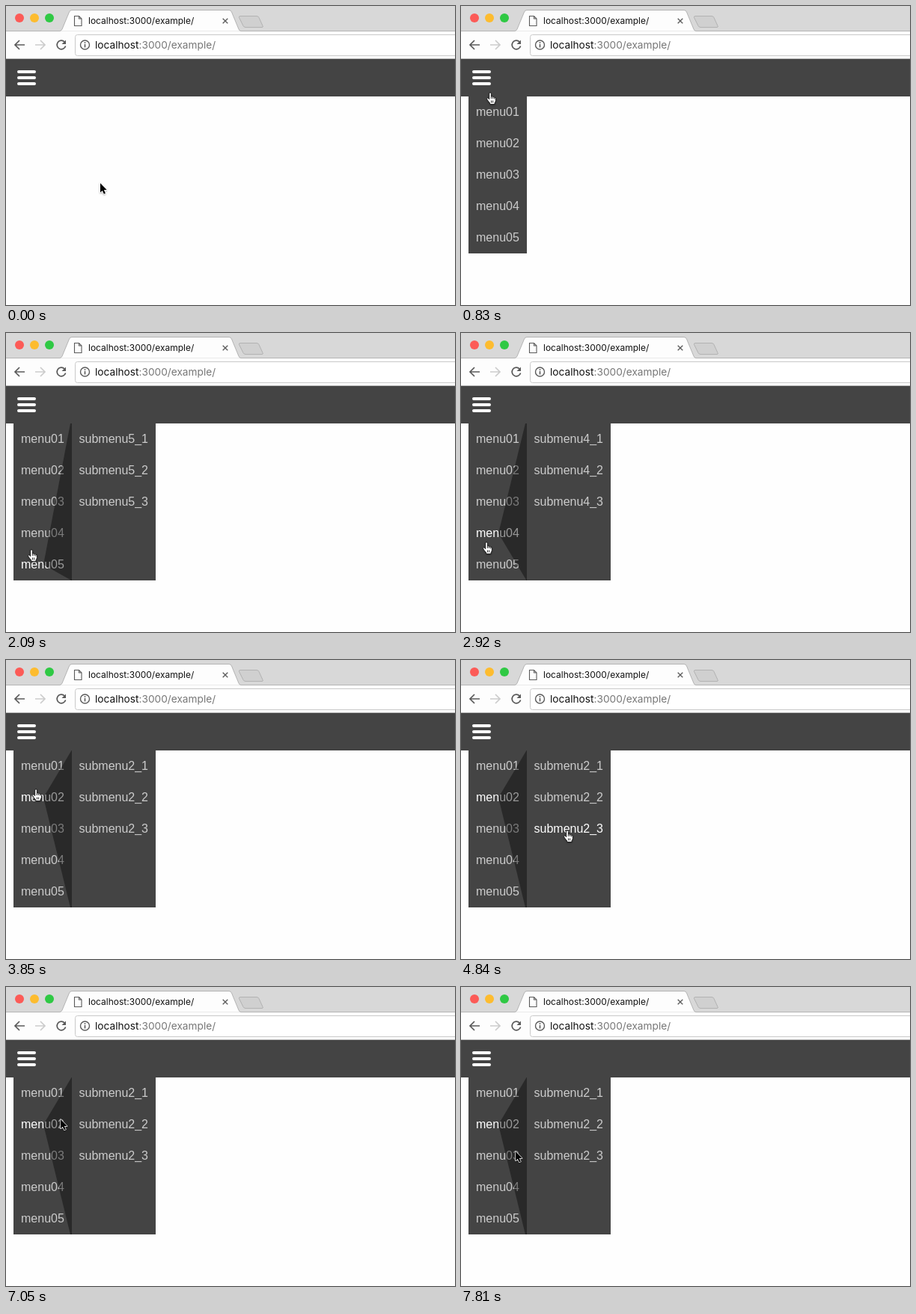
These frames come from a looping animation (600x400 px, 8 s). An HTML page:

```html
<!DOCTYPE html>
<html lang="en">
<head>
<meta charset="utf-8">
<title>Menu aim</title>
<style>
  html, body { margin: 0; width: 100%; height: 100%; overflow: hidden; background: #fefefe; }
  svg { display: block; width: 600px; height: 400px; }
  .ui { font-family: Inter, Roboto, sans-serif; }
  .menu { font: 16px "Liberation Sans", Arial, sans-serif; fill: #ccc; }
  .menu .on { fill: #fff; }
  .icon { fill: none; stroke: #5a5a5a; stroke-width: 1.7; }
</style>
</head>
<body>
<svg viewBox="0 0 600 400">
  <defs>
    <filter id="shade" x="-50%" y="-50%" width="200%" height="200%">
      <feDropShadow dx="0" dy="1" stdDeviation=".8" flood-opacity=".35"/>
    </filter>
  </defs>

  <!-- browser window -->
  <rect width="600" height="34" fill="#d8d8d8"/>
  <circle cx="18" cy="16" r="6" fill="#fc5b57"/>
  <circle cx="38" cy="16" r="6" fill="#fdbc2f"/>
  <circle cx="58" cy="16" r="6" fill="#2fc944"/>
  <rect y="34" width="600" height="37" fill="#fdfdfd"/>
  <path d="M0 33.5H72Q74 33 75 31L84.500 8Q85.500 5.500 88 5.500H298Q300.500 5.500 301.500 8L311 31Q312 33.500 314 33.500H600" fill="#fdfdfd" stroke="#b4b4b4"/>
  <path d="M73 34H313V36H73Z" fill="#fdfdfd"/>
  <path d="M313 13.500H335Q337 13.500 338 15.500L343 26.500Q344 28.500 342 28.500H320Q318 28.500 317 26.500L311.500 15.500Q311 13.500 313 13.500Z" fill="#d0d0d0" stroke="#b2b2b2"/>
  <path d="M91.500 13.500H97.500L101 17V26.500H91.500ZM97.500 13.500V17H101" class="icon" style="stroke-width:1.100"/>
  <path d="M289.700 16.700L296.300 23.300M296.300 16.700L289.700 23.300" class="icon" style="stroke-width:1.300"/>
  <text class="ui" x="110" y="24.300" font-size="12" fill="#111">localhost:3000/example/</text>
  <path d="M25 52H12M18 46L12 52L18 58" class="icon"/>
  <path d="M39 52H52M46 46L52 52L46 58" class="icon" style="stroke:#ccc"/>
  <path d="M78.200 48A5.800 5.800 0 1 0 79.600 53.500" class="icon"/>
  <path d="M80 45.500V51H74.500Z" fill="#5a5a5a"/>
  <rect x="92.500" y="38.500" width="520" height="28" rx="3" fill="#fff" stroke="#c9c9c9"/>
  <circle cx="105.500" cy="52" r="6" class="icon" style="stroke-width:1.400"/>
  <path d="M105.500 51V55.500M105.500 48.300V50" class="icon" style="stroke-width:1.600"/>
  <text class="ui" x="119" y="57" font-size="13.700" fill="#111">localhost<tspan fill="#777">:3000/example/</tspan></text>

  <!-- page -->
  <path d="M0 70.500H600" stroke="#b8b8b8"/>
  <rect y="71" width="600" height="50" fill="#444"/>
  <path d="M17 88H38M17 96H38M17 104H38" stroke="#fff" stroke-width="4" stroke-linecap="round"/>
  <g id="menu" class="menu">
    <rect x="10" y="121" width="78" height="210" fill="#444"/>
    <g id="items"></g>
    <g id="submenu">
      <rect x="88" y="121" width="112" height="210" fill="#444"/>
      <g id="subitems"></g>
      <polygon id="wedge" fill="#000" fill-opacity=".4"/>
    </g>
  </g>

  <g id="cursor" filter="url(#shade)" stroke-linejoin="round">
    <path id="arrow" d="M0 0V12.400L2.800 9.900L4.900 14.400L6.900 13.500L4.900 9.100H8.700Z" fill="#000" stroke="#fff" stroke-width="1.300" paint-order="stroke"/>
    <path id="hand" d="M-1.300 8V1.200Q-1.200 -.3 0 -.3Q1.300 -.3 1.400 1.200V5.300Q2.700 4.500 3.600 5.700Q4.900 5.200 5.700 6.400Q7.300 6.200 7.400 7.800V10.500Q7.200 12.300 6 13.700V15.500H-.3V14Q-2 12.300 -4.200 8.900Q-4.900 7.500 -3.700 7.100Q-2.600 6.800 -1.300 8.800ZM1.400 5.300V8M3.600 5.900V8M5.700 6.600V8.500M1.500 10.500V13.500M3.600 10.500V13.500" fill="#fff" stroke="#111" stroke-width=".9"/>
  </g>
</svg>
<script>
const LOOP = 8000, TOP = 121, ROW = 42, MENU_RIGHT = 88, TIP_X = 50;
const $ = id => document.getElementById(id);

const ease = {
  linear: p => p,
  in: p => p * p,
  out: p => 1 - (1 - p) ** 2,
  both: p => p * p * (3 - 2 * p),
};

// Pointer moves: first step, last step (ms), step count, destination x, y, easing
const moves = [
  [480, 940, 9, 27, 99, 'both'],
  [1480, 1590, 3, 25, 141, 'linear'],
  [1646, 2210, 11, 35, 302, 'out'],
  [2330, 2330, 1, 34, 302, 'linear'],
  [2570, 2920, 6, 34, 280, 'in'],
  [2980, 3320, 7, 40, 191, 'linear'],
  [3380, 3490, 3, 39, 171, 'out'],
  [3670, 3850, 3, 39.5, 173, 'linear'],
  [4090, 4660, 11, 141, 231, 'both'],
  [4840, 4840, 1, 142, 228, 'linear'],
  [4900, 5550, 12, 143, 136, 'both'],
  [5720, 6130, 8, 144, 183, 'both'],
  [6250, 6470, 5, 140, 179, 'linear'],
  [6530, 6760, 5, 73, 176, 'both'],
  [7050, 7810, 14, 73, 220, 'both'],
];

const rowAt = y => Math.floor((y - TOP) / ROW) + 1;
const tipY = item => TOP + ROW * (item - 0.5);

function inWedge(x, y, item) {
  if (!item || x < TIP_X || x >= MENU_RIGHT) return false;
  const reach = (x - TIP_X) / (MENU_RIGHT - TIP_X), tip = tipY(item);
  return y > tip - (tip - TOP) * reach && y < tip + (TOP + 5 * ROW - tip) * reach;
}

// Each pose follows from the previous one and the new pointer position
function nextPose(prev, t, x, y) {
  const pose = { t, x, y, open: prev.open, item: prev.item, sub: 0, hand: false };
  if (y < TOP) {
    pose.open = pose.hand = true;
  } else if (pose.open && !inWedge(x, y, pose.item)) {
    const row = rowAt(y);
    if (x < MENU_RIGHT) {
      pose.item = row;
      pose.hand = true;
    } else if (pose.item && row <= 3) {
      pose.sub = row;
      pose.hand = true;
    }
  }
  return pose;
}

const poses = [{ t: 0, x: 126, y: 237, open: false, item: 0, sub: 0, hand: false }];
for (const [start, end, count, x, y, curve] of moves) {
  const from = poses[poses.length - 1];
  for (let k = 1; k <= count; k++) {
    const p = ease[curve](k / count);
    const t = count > 1 ? start + (end - start) * (k - 1) / (count - 1) : start;
    poses.push(nextPose(poses[poses.length - 1], t,
      from.x + (x - from.x) * p, from.y + (y - from.y) * p));
  }
}

function addRows(parent, x, count) {
  return Array.from({ length: count }, (_, i) => {
    const text = document.createElementNS('http://www.w3.org/2000/svg', 'text');
    text.setAttribute('x', x);
    text.setAttribute('y', TOP + ROW * i + 26);
    return parent.appendChild(text);
  });
}
const items = addRows($('items'), 20, 5);
const subitems = addRows($('subitems'), 97.5, 3);
items.forEach((text, i) => { text.textContent = `menu0${i + 1}`; });

const show = (el, on) => { el.style.display = on ? '' : 'none'; };

function draw({ x, y, open, item, sub, hand }) {
  show($('menu'), open);
  show($('submenu'), item > 0);
  show($('hand'), hand);
  show($('arrow'), !hand);
  items.forEach((text, i) => text.classList.toggle('on', i + 1 === item));
  subitems.forEach((text, i) => {
    text.textContent = `submenu${item}_${i + 1}`;
    text.classList.toggle('on', i + 1 === sub);
  });
  const bottom = TOP + 5 * ROW;
  $('wedge').setAttribute('points',
    `88,${TOP} ${item > 3 ? 86 : 87.5},${TOP} ${TIP_X},${tipY(item)} ${item < 3 ? 86 : 87.5},${bottom} 88,${bottom}`);
  $('cursor').setAttribute('transform', `translate(${Math.round(x)} ${Math.round(y)})`);
}

let shown;
function frame() {
  const t = performance.now() % LOOP;
  const pose = poses.findLast(p => p.t <= t + 1);
  if (pose !== shown) draw(shown = pose);
  requestAnimationFrame(frame);
}
frame();
</script>
</body>
</html>
```
